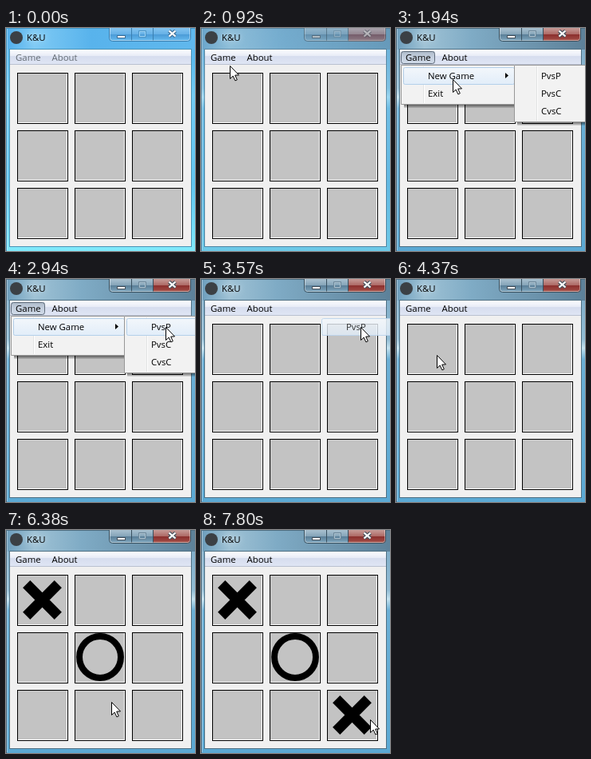
Write an HTML page with a canvas that moves like this. It is 237 by 279 pixels and loops after 8 s.

```html
<!DOCTYPE html>
<html lang="en">
<head>
<meta charset="utf-8">
<title>Noughts and crosses</title>
<style>
html, body { margin: 0; width: 100%; height: 100%; overflow: hidden; }
canvas { display: block; width: 237px; height: 279px; }
</style>
</head>
<body>
<canvas id="stage"></canvas>
<script>
const W = 237, H = 279, LOOP = 8000;
const canvas = document.getElementById('stage');
const dpr = window.devicePixelRatio || 1;
canvas.width = W * dpr;
canvas.height = H * dpr;
const g = canvas.getContext('2d');
g.scale(dpr, dpr);

// pointer stops: time, x, y
const stops = [
  [200, 171, 272], [520, 150, 210], [720, 90, 120], [920, 36, 47],
  [1120, 32, 43], [1340, 40, 50], [1520, 67, 62], [1720, 71, 64],
  [2340, 95, 64], [2540, 140, 62], [2740, 178, 60], [2940, 200, 60],
  [3770, 196, 100], [3970, 160, 172], [4170, 95, 150], [4370, 51, 95],
  [4770, 75, 130], [4970, 125, 205], [5170, 146, 230],
  [5980, 127, 172], [6380, 132, 215], [6580, 150, 243], [6780, 182, 249],
  [7000, 206, 237], [7200, 212, 237]
];

function rect(x, y, w, h, fill) {
  g.fillStyle = fill;
  g.fillRect(x, y, w, h);
}

function outline(x, y, w, h, color, r = 0) {
  g.strokeStyle = color;
  g.lineWidth = 1;
  g.beginPath();
  g.roundRect(x + .5, y + .5, w - 1, h - 1, r);
  g.stroke();
}

function shade(x0, y0, x1, y1, ...list) {
  const grad = g.createLinearGradient(x0, y0, x1, y1);
  list.forEach(([p, c]) => grad.addColorStop(p, c));
  return grad;
}

function label(s, x, y, color = '#000') {
  g.font = '11.4px "Open Sans", "Noto Sans", sans-serif';
  g.fillStyle = color;
  g.fillText(s, x, y);
}

function faded(alpha, draw) {
  if (alpha <= 0) return;
  g.save();
  g.globalAlpha = alpha;
  draw();
  g.restore();
}

function captionButtons(active) {
  g.save();
  g.beginPath();
  g.roundRect(129, -5, 103, 22, 5);
  g.clip();
  const glass = active
    ? shade(0, 0, 0, 17, [0, '#a9c1d0'], [.45, '#86a5b9'], [.5, '#5b8099'], [1, '#84abc2'])
    : shade(0, 0, 0, 17, [0, '#82c4f0'], [.45, '#67b1e6'], [.5, '#4c9cd8'], [1, '#69bdf0']);
  rect(129, 0, 103, 17, glass);
  if (active) {
    rect(185, 0, 47, 17, shade(0, 0, 0, 17,
      [0, '#c79c98'], [.45, '#ae6a66'], [.5, '#8c302e'], [.8, '#9c4540'], [1, '#bd7d70']));
  }
  g.restore();
  const edge = active ? '#38505f' : '#3a7fb0';
  outline(129, -5, 103, 22, edge, 4);
  rect(157, 0, 1, 16, edge);
  rect(184, 0, 1, 16, edge);
  outline(130, -5, 101, 21, 'rgba(255,255,255,.4)', 3);

  const ink = active ? '#46525d' : '#3f7199';
  rect(139, 9, 11, 4, ink);
  rect(140, 10, 9, 2, '#fff');
  outline(166, 3, 10, 9, active ? '#6d8799' : '#4d94c4');
  outline(167, 4, 8, 7, active ? '#a9c0ce' : '#9bd2f5');
  [[4.4, ink], [2.3, '#fff']].forEach(([w, c]) => {
    g.strokeStyle = c;
    g.lineWidth = w;
    g.beginPath();
    g.moveTo(204.5, 3.5); g.lineTo(212.5, 10.5);
    g.moveTo(212.5, 3.5); g.lineTo(204.5, 10.5);
    g.stroke();
  });
}

function frameGlass(active) {
  rect(0, 0, W, H, active
    ? shade(0, 0, 0, H, [0, '#7ba7c3'], [.1, '#82afca'], [.27, '#93bdd5'],
        [.31, '#c4e2ef'], [.36, '#6cb0d6'], [1, '#5ba9d4'])
    : shade(0, 0, 0, H, [0, '#58b4ec'], [.15, '#5cbcef'], [.3, '#74cdf5'],
        [.7, '#62c6f1'], [1, '#80eafb']));
  rect(0, 0, W, 27, active
    ? shade(0, 0, W, 0, [0, '#6c9dbc'], [.15, '#9fc2d5'], [.4, '#7fabc5'], [1, '#5d8199'])
    : shade(0, 0, W, 0, [0, '#50aeeb'], [.15, '#7fcaf4'], [.45, '#58b3ec'], [1, '#60b8ed']));
  rect(0, 0, 1, H, active ? '#456478' : '#3f8fb8');
  rect(0, 0, W, 1, active ? '#4f6f82' : '#4398c8');
  rect(1, 1, 1, H - 2, 'rgba(255,255,255,.4)');
  rect(4, 26, 229, 248, active ? '#4f6f82' : '#4b93b5');
  captionButtons(active);
}

function menuBar(active) {
  rect(5, 27, 227, 19, shade(0, 27, 0, 46,
    [0, '#fdfeff'], [.42, '#e7ebf6'], [.45, '#d6ddee'], [1, '#e0e6f5']));
  rect(5, 45, 227, 1, '#b9c0d0');
  const ink = active ? '#000' : '#646c74';
  label('Game', 12, 41, ink);
  label('About', 57.5, 41, ink);
}

function pressedGame() {
  g.fillStyle = shade(0, 29, 0, 45, [0, '#adbac9'], [.5, '#c5d0df'], [1, '#d2dcea']);
  g.beginPath();
  g.roundRect(6, 29, 43, 16, 3);
  g.fill();
  outline(6, 29, 43, 16, '#5f6b7a', 3);
  label('Game', 12, 41);
}

function board() {
  rect(5, 46, 227, 227, '#f0f0f0');
  for (let i = 0; i < 9; i++) {
    const x = 14 + i % 3 * 72, y = 56 + Math.floor(i / 3) * 72;
    rect(x, y, 64, 64, '#000');
    rect(x + 1, y + 1, 62, 62, '#fff');
    rect(x + 1, y + 1, 61, 61, '#c3c3c3');
  }
}

function cross(x, y) {
  const d = 19.8;
  g.strokeStyle = '#000';
  g.lineWidth = 13;
  g.beginPath();
  g.moveTo(x - d, y - d); g.lineTo(x + d, y + d);
  g.moveTo(x + d, y - d); g.lineTo(x - d, y + d);
  g.stroke();
}

function nought(x, y) {
  g.strokeStyle = '#000';
  g.lineWidth = 8;
  g.beginPath();
  g.arc(x, y, 26, 0, 7);
  g.stroke();
}

function highlight(x, y, w) {
  g.fillStyle = shade(0, y, 0, y + 22, [0, '#f3f7fb'], [1, '#e1edf9']);
  g.beginPath();
  g.roundRect(x, y, w, 22, 2);
  g.fill();
  outline(x, y, w, 22, '#b4d0ea', 2);
}

function popup(x, w, items, picked) {
  const h = items.length * 22 + 6, right = x + w, bottom = 46 + h;
  for (let i = 1; i < 5; i++) {
    rect(right, 50, i, h - 4, 'rgba(0,0,0,.14)');
    rect(x + 4, bottom, w - 4 + i, i, 'rgba(0,0,0,.14)');
  }
  rect(x, 46, w, h, '#f2f2f2');
  outline(x, 46, w, h, '#979797');
  rect(x + 28, 48, 1, h - 4, '#e2e3e3');
  rect(x + 29, 48, 1, h - 4, '#fff');
  if (picked >= 0) highlight(x + 3, 49 + picked * 22, w - 6);
  items.forEach((s, i) => label(s, x + 34, 64 + i * 22));
}

function mainMenu(picked) {
  popup(6, 146, ['New Game', 'Exit'], picked);
  g.fillStyle = '#000';
  g.beginPath();
  g.moveTo(137, 56); g.lineTo(141, 59.5); g.lineTo(137, 63);
  g.fill();
}

function pointer(x, y) {
  const path = [0, 0, 0, 16, 3.7, 12.6, 6.4, 18.4, 8.8, 17.3, 6.2, 11.6, 11, 11.4];
  g.beginPath();
  for (let i = 0; i < path.length; i += 2) g.lineTo(x + .5 + path[i], y + .5 + path[i + 1]);
  g.closePath();
  g.fillStyle = '#fff';
  g.fill();
  g.strokeStyle = '#000';
  g.lineWidth = 1;
  g.stroke();
}

function draw(t) {
  const within = (a, b) => t >= a && t < b;
  frameGlass(false);
  faded(t < 920 ? 0 : t < 1120 ? .5 : t < 1340 ? .9 : 1, () => frameGlass(true));

  g.fillStyle = '#3b4045';
  g.beginPath();
  g.arc(13, 12, 8, 0, 7);
  g.fill();
  g.save();
  g.shadowColor = 'rgba(255,255,255,.8)';
  g.shadowBlur = 6 * dpr;
  label('K&U', 26, 16);
  g.restore();

  menuBar(t >= 920);
  board();
  if (t >= 4570) cross(45.5, 87.5);
  if (t >= 6180) nought(118, 159);
  if (t >= 7800) cross(189.5, 231.5);

  if (within(1120, 3570)) {
    pressedGame();
    faded(t < 1340 ? .8 : 1, () => mainMenu(t < 1520 ? -1 : 0));
  }
  if (within(1720, 3570)) {
    faded(t < 1940 ? .6 : 1, () =>
      popup(148, 98, ['PvsP', 'PvsC', 'CvsC'], t < 2740 ? -1 : 0));
  }
  if (within(3570, 3970)) {
    faded(t < 3770 ? .8 : .3, () => {
      highlight(151, 49, 92);
      label('PvsP', 182, 64);
    });
  }

  const stop = stops.filter(s => s[0] <= t).pop();
  if (stop) pointer(stop[1], stop[2]);
}

function tick(now) {
  g.clearRect(0, 0, W, H);
  draw(now % LOOP);
  requestAnimationFrame(tick);
}
requestAnimationFrame(tick);
</script>
</body>
</html>
```
